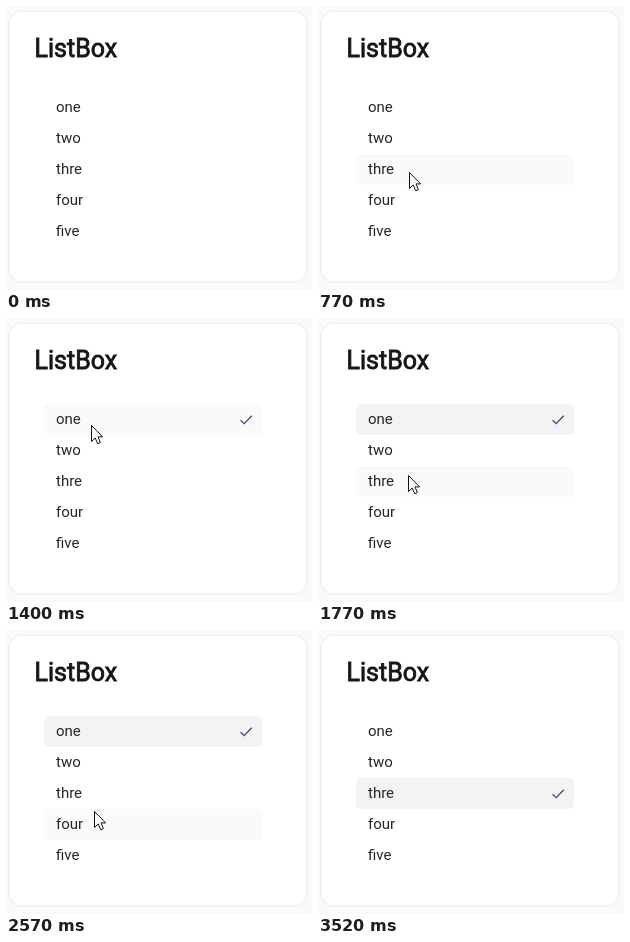
An HTML page for the animation above (5360 ms loop, 306x284 px).

```html
<!DOCTYPE html>
<html lang="en">
<head>
<meta charset="utf-8">
<title>ListBox</title>
<style>
  html, body { margin: 0; width: 100%; height: 100%; overflow: hidden; background: #fafafa; }
  body { position: relative; font-family: Roboto, "Liberation Sans", sans-serif; color: #262626; }
  .card {
    position: absolute; left: 2px; top: 4px; width: 300px; height: 273px; box-sizing: border-box;
    background: #fff; border: 2px solid #f2f2f2; border-radius: 14px;
  }
  h2 {
    position: absolute; left: 28.5px; top: 28px; margin: 0;
    font-size: 25px; line-height: 30px; font-weight: 400; color: #161616;
    -webkit-text-stroke: .8px #161616;
  }
  ul { position: absolute; left: 38px; top: 86px; width: 218px; margin: 0; padding: 0; list-style: none; }
  li {
    position: relative; height: 31px; padding-left: 12px; border-radius: 5px;
    font-size: 15px; line-height: 31px;
  }
  li.selected { background: #f3f3f3; }
  li.hover { background: #fafafa; }
  li svg { position: absolute; left: 195px; top: 9px; visibility: hidden; }
  li.selected svg { visibility: visible; }
  #pointer { position: absolute; left: 0; top: 0; }
  #click {
    position: absolute; left: 0; top: 0; width: 30px; height: 30px; margin: -15px;
    border-radius: 50%; background: #ffff80; mix-blend-mode: multiply;
  }
</style>
</head>
<body>
<div class="card"></div>
<h2>ListBox</h2>
<ul id="list"></ul>
<svg id="pointer" width="14" height="21" viewBox="0 0 14 21">
  <path d="M.5 .5V16.5L4.2 13L6.8 18.8L9.4 17.6L7 11.9H11.6Z" fill="#fff" stroke="#111" stroke-linejoin="round"/>
</svg>
<div id="click"></div>
<script>
  const LOOP = 5360, ROW_TOP = 86, ROW_HEIGHT = 31;
  const TICK = 78, TICK_SHIFT = 14; // the pointer is sampled once per tick

  const enter = { at: 460, x: 214, y: 268 };
  const leave = 3520;
  // Pointer moves: [start ms, end ms, x, y]
  const moves = [
    [454, 766, 91, 166],
    [766, 1078, 85, 107],
    [1546, 1858, 95, 207],
    [1936, 2170, 96, 180],
    [2170, 2482, 92, 244],
    [2482, 2560, 88, 181],
    [2560, 2794, 88, 171],
    [3106, 3496, 155, 275]
  ];
  // Each click marks the pointer for a while and selects a row
  const clicks = [
    { from: 1160, to: 1400, select: 1240, row: 0 },
    { from: 2960, to: 3200, select: 2960, row: 2 }
  ];

  const list = document.getElementById('list');
  const pointer = document.getElementById('pointer');
  const click = document.getElementById('click');

  const rows = ['one', 'two', 'thre', 'four', 'five'].map(label => {
    const row = document.createElement('li');
    row.innerHTML = label + '<svg width="16" height="14"><path d="M1.6 7.2L5.2 10.7L12.8 2.8"' +
      ' fill="none" stroke="#45458a" stroke-width="1.3"/></svg>';
    list.append(row);
    return row;
  });

  const clamp = v => Math.min(1, Math.max(0, v));
  const ease = p => p * p * (3 - 2 * p);

  function pointerAt(t) {
    const time = Math.floor((t + TICK_SHIFT) / TICK) * TICK - TICK_SHIFT;
    let { x, y } = enter;
    for (const [start, end, toX, toY] of moves) {
      const p = ease(clamp((time - start) / (end - start)));
      x += (toX - x) * p;
      y += (toY - y) * p;
    }
    return [Math.round(x), Math.round(y)];
  }

  function show(el, visible, x, y) {
    el.style.visibility = visible ? 'visible' : 'hidden';
    el.style.transform = `translate(${x}px, ${y}px)`;
  }

  function draw(now) {
    const t = now % LOOP;
    const visible = t >= enter.at && t < leave;
    const [x, y] = pointerAt(t);
    const hovered = visible ? Math.floor((y - ROW_TOP) / ROW_HEIGHT) : -1;
    const selected = clicks.filter(c => t >= c.select).pop()?.row;

    show(pointer, visible, x, y);
    show(click, clicks.some(c => t >= c.from && t < c.to), x, y);
    rows.forEach((row, i) => {
      row.classList.toggle('hover', i === hovered);
      row.classList.toggle('selected', i === selected);
    });
  }

  let start;
  function tick(now) {
    start ??= now;
    draw(now - start);
    requestAnimationFrame(tick);
  }
  draw(0);
  requestAnimationFrame(tick);
</script>
</body>
</html>
```
